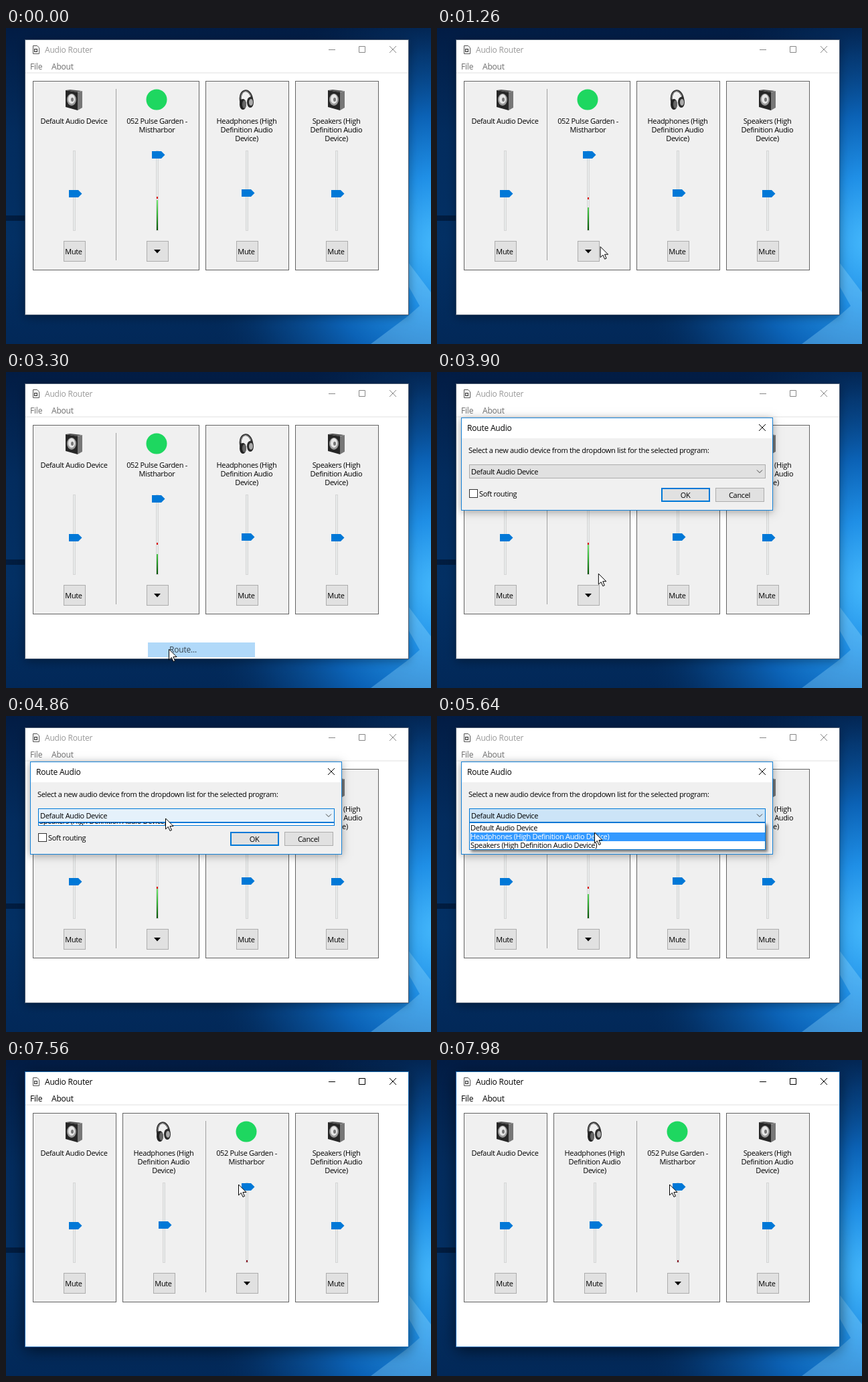
An HTML page with a canvas for the animation above (8 s loop, 635 px wide and 472 px high).

```html
<!DOCTYPE html>
<html lang="en">
<head>
<meta charset="utf-8">
<title>Audio Router</title>
<style>
  html, body { margin: 0; width: 100%; height: 100%; overflow: hidden; background: #02214d; }
  canvas { display: block; }
</style>
</head>
<body>
<canvas id="stage" width="635" height="472"></canvas>
<script>
const LOOP = 8000, STEP = 60;
const ACCENT = '#0078d7', FACE = '#e1e1e1', EDGE = '#adadad', PANEL = '#f0f0f0', HOVER = '#e5f1fb';
const DEVICE = ['Default Audio Device'];
const HEADPHONES = ['Headphones (High', 'Definition Audio', 'Device)'];
const SPEAKERS = ['Speakers (High', 'Definition Audio', 'Device)'];
const PLAYER = ['052 Pulse Garden -', 'Mistharbor'];
const c = document.getElementById('stage').getContext('2d');

const MOVES = [
  { from: 180, to: 840, x: 359, y: 262 },
  { from: 840, to: 1380, x: 227.5, y: 336 },
  { from: 2580, to: 3060, x: 243.5, y: 414 },
  { from: 3600, to: 4260, x: 238.5, y: 153 },
  { from: 5100, to: 5460, x: 235.5, y: 174 },
  { from: 6440, to: 6900, x: 347.5, y: 186 },
];

const progress = (t, from, to) => Math.min(1, Math.max(0, (t - from) / (to - from)));
const smooth = p => p * p * (3 - 2 * p);

function pointerAt(t) {
  return MOVES.reduce((at, move) => {
    const k = smooth(progress(t, move.from, move.to));
    return { x: at.x + (move.x - at.x) * k, y: at.y + (move.y - at.y) * k };
  }, { x: 642, y: 66 });
}

// The music swells about once a second; the peak mark sinks slowly.
const meterLevel = t => Math.round(257 + 18 * Math.sin(Math.PI * t / 980) ** 2);
const meterPeak = t => Math.round(252 + 3 * progress(t, 0, 3600));

function rect(x, y, w, h, fill) {
  c.fillStyle = fill;
  c.fillRect(x, y, w, h);
}

function box(x, y, w, h, fill, edge, line = 1) {
  rect(x, y, w, h, edge);
  rect(x + line, y + line, w - 2 * line, h - 2 * line, fill);
}

function text(str, x, y, { color = '#000', size = 11, align = 'left' } = {}) {
  c.font = size + 'px "Open Sans", "Noto Sans", sans-serif';
  c.letterSpacing = size === 11 ? '-0.33px' : '-0.2px';
  c.textAlign = align;
  c.fillStyle = color;
  c.fillText(str, x, y);
}

function shape(path, fill) {
  c.fillStyle = fill;
  c.fill(new Path2D(path));
}

function stroke(path, color, width = 1) {
  c.strokeStyle = color;
  c.lineWidth = width;
  c.stroke(new Path2D(path));
}

function disc(x, y, rx, ry, fill) {
  c.beginPath();
  c.ellipse(x, y, rx, ry, 0, 0, 7);
  c.fillStyle = fill;
  c.fill();
}

function gradient(g, ...colors) {
  colors.forEach((color, i) => g.addColorStop(i / (colors.length - 1), color));
  return g;
}

// Runs draw with canvas settings and an origin that do not outlive it.
function scoped(settings, draw, x = 0, y = 0) {
  c.save();
  Object.assign(c, settings);
  c.translate(x, y);
  draw();
  c.restore();
}

function shadow(x, y, w, h, alpha, blur, dx, dy) {
  scoped({ shadowColor: `rgba(0,0,0,${alpha})`, shadowBlur: blur, shadowOffsetX: dx, shadowOffsetY: dy },
    () => rect(x, y, w, h, '#fff'));
}

function wallpaper() {
  rect(0, 0, 635, 472, gradient(c.createLinearGradient(0, 0, 0, 472), '#021c44', '#032c5e', '#033064', '#022858'));
  rect(0, 280, 29, 8, 'rgba(0,10,30,.5)');
  rect(0, 0, 635, 472, gradient(c.createRadialGradient(650, 320, 10, 650, 320, 370),
    '#43b6fb', '#1f8fe6', '#0b62b6', 'rgba(6,66,130,.7)', 'rgba(3,40,84,0)'));
  shape('M601 350L635 395V445L601 385ZM601 430L635 400V472H545Z', 'rgba(160,225,255,.3)');
}

function speakerIcon() {
  shape('M-12 -14L-5 -15L12 -13L5 -11Z', '#555');
  shape('M-12 -14L6 -11V16L-12 11Z', '#262626');
  shape('M6 -11L13 -13V12L6 16Z', '#777');
  disc(-3, 0, 7, 9, '#9a9a9a');
  disc(-3, -1, 5, 7, '#e6e6e6');
  disc(-2, 0, 2, 3, '#777');
}

function headphonesIcon() {
  stroke('M-8 5C-13 -17 7 -20 9 1', '#333', 3);
  stroke('M-8 -1C-9 -14 3 -17 7 -5', '#999');
  disc(-5, 7, 5, 8, '#222');
  disc(-3, 7, 3, 6, '#666');
  disc(6, 4, 5, 8, '#2c2c2c');
  disc(7, 4, 3, 5, '#aaa');
}

const playerIcon = () => disc(0, 0, 15.5, 15.5, '#1ed760');

function meter(level, peak) {
  rect(0, level, 2, 302 - level, gradient(c.createLinearGradient(0, 254, 0, 302), '#7df07d', '#35b535', '#065006'));
  rect(0, peak, 2, 3, peak > 290 ? '#8c1c28' : '#e01010');
}

// Everything in a column is placed from its centre line.
function column(x, icon, lines, thumb, levels) {
  scoped({}, icon, x, 107);
  scoped({}, () => {
    lines.forEach((line, i) => text(line, 0.5, 143 + 13 * i, { align: 'center' }));
    box(-1, 183, 4, 120, '#e7eaea', '#d6d6d6');
    if (levels) meter(...levels);
    scoped({}, () => shape('M-7 -5.5H7L12.5 0L7 5.5H-7Z', ACCENT), 0, thumb);
    box(-15, 318, 33, 31, FACE, EDGE);
    if (levels) shape('M-4 331H6L1 336.5Z', '#000');
    else text('Mute', 0, 338, { align: 'center' });
  }, x, 0);
}

function mainWindow(t, active, menuActive, routed) {
  shadow(29, 18, 572, 410, active ? 0.6 : 0.4, active ? 22 : 14, 0, active ? 5 : 3);
  box(28, 17, 574, 412, '#fff', active ? '#1769b0' : '#4a5a70');

  stroke('M40.5 26.5H46.5L49.5 29.5V38.5H40.5Z', '#555');
  box(42, 31, 5, 5, '#ddd', '#333');
  text('Audio Router', 58, 37, { size: 12, color: active ? '#000' : '#999' });
  stroke('M482 32.5H492M527.5 27.5H536.5V36.5H527.5ZM573 27L583 37M583 27L573 37', active ? '#000' : '#888');
  const color = menuActive ? '#000' : '#6d6d6d';
  text('File', 36, 62, { size: 12, color });
  text('About', 68, 62, { size: 12, color });
  rect(29, 66, 572, 2, PANEL);

  const [wide, narrow] = routed ? [174, 40] : [40, 298];
  box(wide, 79, 249, 283, PANEL, '#646464');
  [narrow, 432].forEach(x => box(x, 79, 125, 283, PANEL, '#646464'));
  rect(wide + 124, 91, 1, 256, '#a0a0a0');
  column(101, speakerIcon, DEVICE, 247.5);
  column(routed ? 235 : 359, headphonesIcon, HEADPHONES, 246.5);
  column(493, speakerIcon, SPEAKERS, 247.5);
  column(routed ? 359 : 225, playerIcon, PLAYER, 189.5, routed ? [302, 299] : [meterLevel(t), meterPeak(t)]);
}

function contextMenu(t, pointerY) {
  const items = [['Mute/Unmute', 353], ['Duplicate...', 382], ['Route...', 404]];
  const drawItem = ([label, y]) => {
    if (pointerY >= y && pointerY < y + 22) rect(212, y, 160, 22, '#91c9f7');
    text(label, 244, y + 15, { size: 12 });
  };
  if (t >= 3180) {
    scoped({ globalAlpha: 1 - progress(t, 3120, 3720) }, () => drawItem(items[2]));
    return;
  }
  scoped({ globalAlpha: progress(t, 1740, 1980) }, () => {
    shadow(209, 350, 166, 79, 0.4, 4, 3, 3);
    box(209, 350, 166, 79, '#f2f2f2', '#ccc');
    rect(240, 378, 132, 1, '#d0d0d0');
    items.forEach(drawItem);
  });
}

function dropdown(t, pointerY) {
  const open = progress(t, 4800, 5040);
  const height = Math.round(4 + 37 * open ** 3);
  const hovered = t < 5100 ? 0 : Math.floor(progress(pointerY, 161, 200) * 3);
  if (open === 1) shadow(48, 159, 443, height, 0.5, 4, 3, 3);
  box(48, 159, 443, height, '#fff', ACCENT);
  scoped({}, () => {
    c.beginPath();
    c.rect(49, 159, 441, height - 1);
    c.clip();
    [DEVICE, HEADPHONES, SPEAKERS].forEach((lines, i) => {
      const y = 119 + 13 * i + height;
      if (i === hovered) rect(50, y + 1, 440, 13, '#3399ff');
      text(lines.join(' '), 50, y + 11, { color: i === hovered ? '#fff' : '#000' });
    });
  });
}

function button(x, label, face, edge, line) {
  box(x, 173, 73, 21, face, edge, line);
  text(label, x + 36, 188, { align: 'center' });
}

function dialog(t, pointerY) {
  const shown = smooth(progress(t, 3480, 3720)) * (1 - progress(t, 7260, 7500));
  scoped({ globalAlpha: shown }, () => {
    const scale = 0.9 + 0.1 * shown;
    c.scale(scale, scale);
    c.translate(-269, -138);
    shadow(36, 68, 466, 139, 0.35, 12, 0, 2);
    box(36, 68, 466, 139, PANEL, '#1883d7');
    rect(37, 69, 464, 30, '#fff');
    text('Route Audio', 45, 88, { size: 12 });
    stroke('M481 78L491 88M491 78L481 88', '#000');
    text('Select a new audio device from the dropdown list for the selected program:', 47, 121);

    const chosen = t >= 5940, listOpen = t >= 4800 && !chosen;
    const hot = t >= 4200 && t < 6180;
    const face = t >= 5040 && !chosen ? '#cce4f7' : hot ? HOVER : FACE;
    box(48, 138, 443, 21, face, hot ? ACCENT : EDGE);
    text((chosen ? HEADPHONES : DEVICE).join(' '), 51, 153);
    stroke('M478 146.5L482 150.5L486 146.5', '#444');

    box(48, 175, 13, 13, '#fff', '#333');
    text('Soft routing', 63, 186);
    button(335, 'OK', t >= 7140 ? '#cce4f7' : t >= 6840 ? HOVER : FACE, ACCENT, 2);
    button(416, 'Cancel', FACE, EDGE, 1);
    if (listOpen) dropdown(t, pointerY);
  }, 269, 138);
}

function pointer() {
  const arrow = 'M0 0V16L3.8 12.4L6.5 18.5L9 17.4L6.4 11.5H11.5Z';
  shape(arrow, '#fff');
  stroke(arrow, '#000');
}

function draw(now) {
  const t = Math.floor((now % LOOP) / STEP) * STEP;
  const { x, y } = pointerAt(t);
  const focused = start => (t >= start && t < 3240) || t >= 7320;
  wallpaper();
  mainWindow(t, focused(1740), focused(1680), t >= 7500);
  if (t >= 1740 && t < 3480) contextMenu(t, y);
  if (t >= 3480 && t < 7500) dialog(t, y);
  scoped({}, pointer, x, y);
  requestAnimationFrame(() => draw(performance.now()));
}

draw(0);
</script>
</body>
</html>
```
